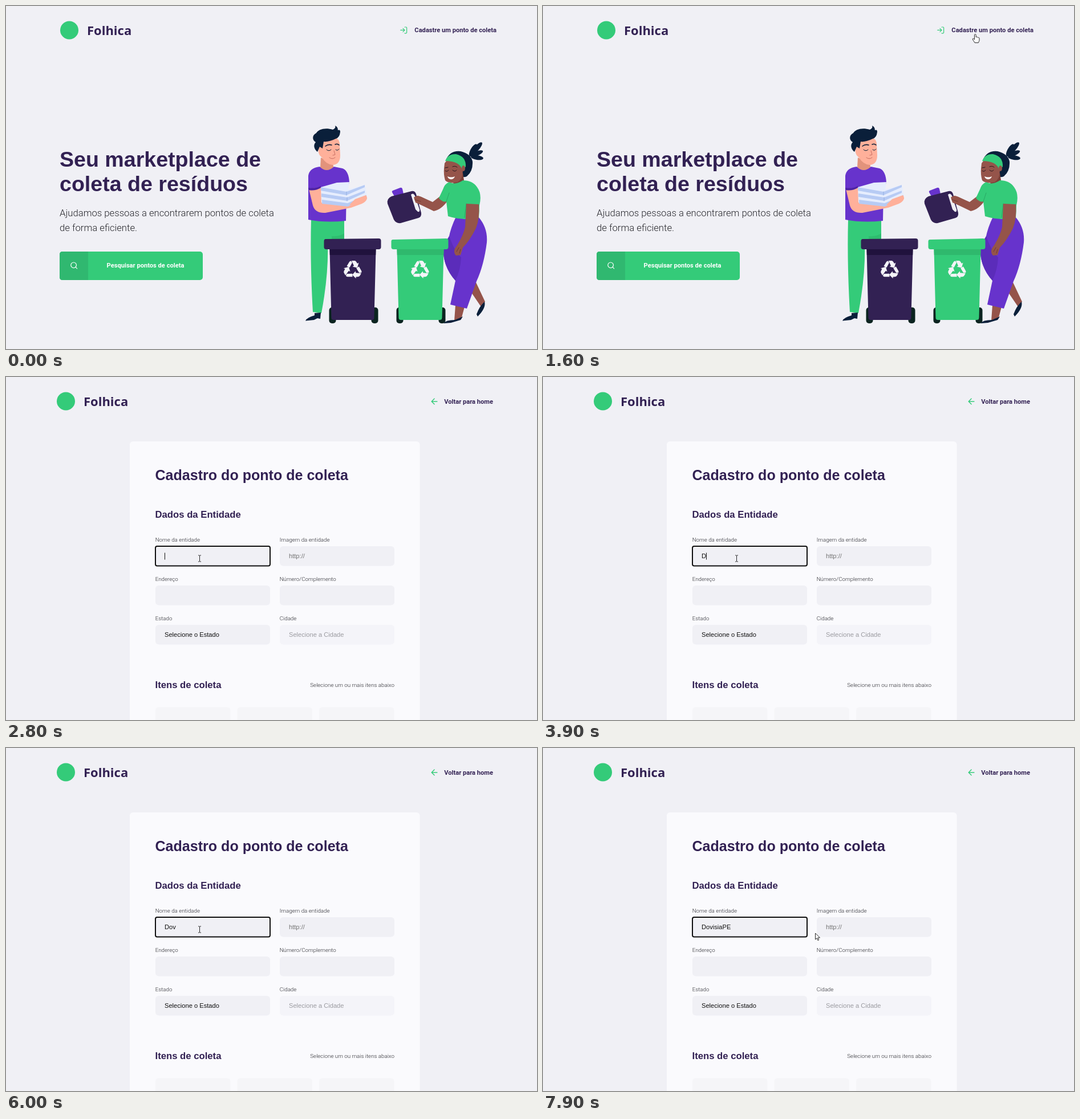
Write an HTML page that moves like this. It is 931 px wide and 602 px high and loops after 8 s.

```html
<!DOCTYPE html>
<html lang="pt-BR">
<head>
<meta charset="utf-8">
<title>Pontos de coleta</title>
<style>
html, body { margin: 0; width: 100%; height: 100%; overflow: hidden; background: #f0f0f5; }
svg { display: block; width: 100vw; height: 100vh; }
.brand { font: 700 22px "Noto Sans", sans-serif; fill: #322153; }
.head { font-family: "Liberation Sans", Arial, sans-serif; font-weight: 700; fill: #322153; }
.link { font: 700 11.14px Roboto, sans-serif; fill: #322153; }
.lead { font: 300 16.7px Roboto, sans-serif; fill: #26262c; }
.label { font: 300 9.75px Roboto, sans-serif; fill: #26262c; }
.input { font: 11.14px "Liberation Sans", Arial, sans-serif; fill: #111; }
.icon { fill: none; stroke: #34cb79; stroke-width: 2; stroke-linecap: round; stroke-linejoin: round; }
.line { fill: none; stroke-width: 1; stroke-linecap: round; }
</style>
</head>
<body>
<svg viewBox="0 0 931 602" preserveAspectRatio="none">
  <defs>
    <path id="arrow" d="M-10.500-6.500L-6-14Q-4.800-16-2.800-15.500L-1-12.500L-5.500-4ZM-2-16H3Q5-16 6.200-14L8-11L10.500-12.500L8-3.500L-.5-5.500L2-7Z"/>
    <g id="recycle" fill="#f4f4f8">
      <use href="#arrow"/>
      <use href="#arrow" transform="rotate(120)"/>
      <use href="#arrow" transform="rotate(240)"/>
    </g>
    <g id="wheels" fill="#0b2420">
      <rect x="9" y="120" width="12" height="28" rx="5"/>
      <rect x="83" y="120" width="12" height="28" rx="5"/>
    </g>
  </defs>
  <rect width="931" height="602" fill="#f0f0f5"/>

  <g id="header">
    <circle cx="111" cy="42.500" r="16" fill="#34cb79"/>
    <text class="brand" x="142" y="51">Folhica</text>
  </g>

  <g id="home">
    <g class="icon" transform="translate(690 35.2) scale(.6)">
      <path d="M15 3h4a2 2 0 0 1 2 2v14a2 2 0 0 1-2 2h-4M10 17l5-5-5-5M15 12H3"/>
    </g>
    <text class="link" x="860" y="46" text-anchor="end">Cadastre um ponto de coleta</text>
    <g class="head" font-size="37.6">
      <text x="94" y="282">Seu marketplace de</text>
      <text x="94" y="325">coleta de resíduos</text>
    </g>
    <text class="lead" x="94" y="369">Ajudamos pessoas a encontrarem pontos de coleta</text>
    <text class="lead" x="94" y="395">de forma eficiente.</text>
    <rect x="94" y="431" width="251" height="50" rx="5" fill="#34cb79"/>
    <path d="M144 431H99Q94 431 94 436V476Q94 481 99 481H144Z" fill="#30b870"/>
    <g class="icon" style="stroke:#fff" transform="translate(112 448.2) scale(.6)">
      <circle cx="11" cy="11" r="8"/><path d="M21 21l-4.350-4.350"/>
    </g>
    <text class="link" style="fill:#fff" x="244.500" y="459.300" text-anchor="middle">Pesquisar pontos de coleta</text>

    <g id="man">
      <path fill="#34cb79" d="M535 375L593 376V412L564 414Q566 470 553 539L538 537Q533 450 535 375Z"/>
      <path fill="#2fbd6f" d="M571 404Q585 405 593 399V411H571Z"/>
      <path fill="#0a1f3a" d="M541 539L552 538L551 549L546 548L540 551L525 552.500Q527 547 541 543Z"/>
      <path fill="#e2937c" d="M552 266L573 276L575 287Q563 295 551 284Z"/>
      <path fill="#6733cc" d="M550 282Q532 284 530 298V375Q560 381 596 377L597 322L602 310Q601 289 590 285L575 282Q562 294 550 282Z"/>
      <path fill="#ffb09a" d="M555 238Q567 236 578 232Q584 233 585 241L586 262Q586 278 573 279Q561 278 554 266Q546 260 548 250Q550 243 555 249Z"/>
      <path fill="#0a1f3a" d="M546 256C539 250 539 243 543 239C536 235 537 226 544 223C548 216 560 213 573 217Q579 214 577 210Q582 212 582 218Q586 216 586 221Q585 231 578 233Q566 239 557 238L555 250L550 247Z"/>
      <g class="line" stroke="#0a1f3a">
        <path d="M562 252Q566 256 570 252M578 252Q581 255 584 251"/>
        <path stroke-width="1.600" d="M560 246Q565 242 571 244M577 243Q581 241 584 244"/>
        <path stroke="#c86e62" d="M567 266Q572 270 577 266M575 254L577 261L573 262"/>
      </g>
      <path fill="#ffb09a" d="M531 321L552 318L556 344L602 345Q611 337 620 336Q633 331 633 338Q631 344 624 347L605 354L560 363Q542 364 538 350Z"/>
      <path fill="#4d22a5" d="M530 319Q542 321 552 316V319Q542 325 531 323Z"/>
      <path fill="#e6edfd" d="M552 318L580 310L602 309L600 322L629 314L633 335L600 349L553 345Z"/>
      <path fill="#b7cbf4" d="M552 318L597 326L629 314V318L597 332L552 324ZM553 329L598 336L629 324V328L598 342L553 335ZM554 340L599 346L632 332V337L599 352L554 347Z"/>
      <path class="line" stroke="#93aee2" d="M597 326V332M598 336V342"/>
      <path fill="#ffb09a" d="M602 349L612 339L631 332Q635 336 630 342L614 350Z"/>
    </g>

    <g id="woman" fill="#95544a">
      <path d="M823 483L840 519L833 528L814 500ZM788 525L804 528L798 550L786 552Z"/>
      <path fill="#0a1f3a" d="M839 519Q842 530 827 545L825 541Q830 527 839 519ZM801 545L797 551L780 556L767 557Q771 551 787 551Z"/>
      <path fill="#6733cc" d="M789 370Q805 377 829 371Q845 390 843 415Q838 455 825 483L808 531L779 524L788 482Q764 455 767 420L776 408Q780 388 789 370Z"/>
      <path fill="#5b2cba" d="M777 404Q786 430 798 441Q797 463 788 482Q764 455 767 420Z"/>
      <path fill="#0a1f3a" d="M771 271Q778 253 797 255Q815 259 818 273Q819 290 808 299Q800 303 797 295Z"/>
      <g fill="#0a1f3a">
        <ellipse cx="819" cy="253" rx="12" ry="4.500" transform="rotate(-60 819 253)"/>
        <ellipse cx="825" cy="250" rx="14" ry="4.500" transform="rotate(-48 825 250)"/>
        <ellipse cx="825" cy="259" rx="12" ry="4" transform="rotate(-22 825 259)"/>
        <ellipse cx="826" cy="266" rx="11" ry="4" transform="rotate(8 826 266)"/>
      </g>
      <path fill="#7c4138" d="M785 300L801 293L804 313L784 314Z"/>
      <path d="M769 276Q776 265 786 268Q799 272 801 289Q801 303 792 309Q777 313 770 306Q767 296 768 285Z"/>
      <path fill="#34cb79" d="M770 272Q775 259 789 260Q807 264 806 282L800 288Q796 272 770 272Z"/>
      <path fill="#fff" d="M774 299Q781 302 787 299Q785 305 779 304Q775 303 774 299Z"/>
      <g class="line" stroke="#24171e">
        <path d="M770 289Q773 292 776 288M783 288Q787 292 790 288M770 284L775 283M783 282Q788 280 791 283"/>
      </g>
      <ellipse cx="802" cy="285" rx="3" ry="5"/>
      <path d="M761 334L748 344L728 335Q719 331 717 336Q713 342 721 346L750 360Q764 357 774 342Z"/>
      <path fill="#34cb79" d="M777 309Q769 312 766 322L759 337Q765 345 772 343L775 369Q800 377 829 372L830 350Q835 330 826 318Q818 306 801 306Q788 315 777 309Z"/>
      <path class="line" stroke="#29a864" d="M772 343L777 328M807 347L804 371"/>
      <path d="M807 347L829 348Q831 372 824 390Q813 412 801 424L797 437L789 438Q782 430 791 420Q802 402 805 388Z"/>
      <path class="line" stroke="#6f3931" d="M790 431L794 424M795 434L797 427"/>
    </g>

    <g id="jug">
      <path fill="#6733cc" d="M678 324L691 319Q694 318 695 321L697 330L681 334L677 327Q676 325 678 324Z"/>
      <path fill="#322153" d="M676 334L711 325Q717 324 719 330L728 363Q729 370 723 372L692 381Q684 382 680 375L669 347Q667 338 676 334Z"/>
      <path fill="#f0f0f5" d="M710 331Q714 327 717 333L725 357Q726 362 722 361L718 357Z"/>
      <path fill="#95544a" d="M715 336Q720 331 728 335L738 340L733 351L718 345Z"/>
      <path class="line" stroke="#6f3931" d="M717 340L727 343"/>
    </g>

    <g transform="translate(557.5 409)">
      <use href="#wheels"/>
      <path fill="#322153" d="M10 18H91L88 138Q88 142 84 142H17Q13 142 13 138Z"/>
      <path fill="#20123d" d="M10 18H91L90.700 28H10.300Z"/>
      <path fill="#322153" d="M3 0L96-1Q100-1 100 3V14Q100 18 96 18H4Q0 18 0 14V4Q0 0 3 0Z"/>
      <use href="#recycle" x="50.500" y="54"/>
    </g>
    <g transform="translate(675.5 409)">
      <use href="#wheels"/>
      <path fill="#34cb79" d="M10 18H92L89 138Q89 142 85 142H17Q13 142 13 138Z"/>
      <path fill="#2fb96d" d="M10 18H92L91.700 28H10.300Z"/>
      <path fill="#34cb79" d="M3 1L96-1Q100-1 100 3V14Q100 18 96 18H4Q0 18 0 14V4Q0 1 3 1Z"/>
      <use href="#recycle" x="50.500" y="54"/>
    </g>
  </g>

  <g id="form">
    <g id="back" class="icon"><path d="M19 12H5M12 19l-7-7 7-7"/></g>
    <text id="backText" class="link" x="854" text-anchor="end">Voltar para home</text>
    <rect x="217" y="113" width="508.500" height="500" rx="5.600" fill="#fafafd"/>
    <text class="head" font-size="25.07" x="261.500" y="181">Cadastro do ponto de coleta</text>
    <text class="head" font-size="16.7" x="261.500" y="247">Dados da Entidade</text>
    <g id="fields"></g>
    <text class="head" font-size="16.7" x="261.500" y="546">Itens de coleta</text>
    <text class="label" x="681" y="544" text-anchor="end">Selecione um ou mais itens abaixo</text>
    <g fill="#f5f5f8">
      <rect x="262" y="579.500" width="131.500" height="40" rx="5.600"/>
      <rect x="405.500" y="579.500" width="131.500" height="40" rx="5.600"/>
      <rect x="549" y="579.500" width="131.500" height="40" rx="5.600"/>
    </g>
    <rect id="focus" x="262" y="297" width="201" height="34.500" rx="3" fill="none" stroke="#101010" stroke-width="2"/>
    <text id="typed" class="input" x="278" y="318"></text>
    <rect id="caret" y="308.500" width="1" height="12" fill="#111"/>
    <g id="tip">
      <rect x="345.500" y="328.500" width="91" height="17" fill="#fff" stroke="#767676"/>
      <text x="391" y="340" text-anchor="middle" font-family="Open Sans, sans-serif" font-size="8.300" fill="#575757">Preencha este campo.</text>
    </g>
  </g>

  <g id="cursors" stroke="#111" stroke-width=".9" stroke-linejoin="round" fill="#fff">
    <path id="pointer" d="M0 0V11L2.600 8.700L4.400 12.700L6.200 11.900L4.400 8H8Z"/>
    <path id="hand" d="M-1.300 8V.8Q0-1 1.300.8V5Q2.700 4 3.500 5.500Q5 4.600 5.600 6.100Q7 5.600 7.200 7V11Q6.500 13 5.500 15H-.8Q-2.500 12-4.400 9.500Q-5 7.600-3.300 7.500Q-2.300 7.700-1.300 9.500Z"/>
    <path id="beam" fill="none" d="M-2.500-5.500H-.7L0-5L.7-5.500H2.500M0-5V5M-2.500 5.500H-.7L0 5L.7 5.500H2.500"/>
  </g>
</svg>
<script>
const LOOP = 8000;
const NAME = "DovisiaPE";
const $ = id => document.getElementById(id);
const show = (id, on) => $(id).setAttribute("display", on ? "inline" : "none");
const place = (id, x, y) => $(id).setAttribute("transform", `translate(${x} ${y})`);

// column, row, label, inner text, inner text colour, box colour
const FIELDS = [
  [0, 0, "Nome da entidade", "", "", "#f0f0f5"],
  [1, 0, "Imagem da entidade", "http://", "#757575", "#f0f0f5"],
  [0, 1, "Endereço", "", "", "#f0f0f5"],
  [1, 1, "Número/Complemento", "", "", "#f0f0f5"],
  [0, 2, "Estado", "Selecione o Estado", "#111", "#f0f0f5"],
  [1, 2, "Cidade", "Selecione a Cidade", "#9b9ba0", "#f4f4f9"]
];
$("fields").innerHTML = FIELDS.map(([col, row, label, text, ink, box]) => {
  const x = 262 + col * 218, y = 297 + row * 69;
  return `<text class="label" x="${x - .3}" y="${y - 8.5}">${label}</text>
    <rect x="${x}" y="${y}" width="201" height="34.5" rx="5.6" fill="${box}"/>
    <text class="input" x="${x + 16}" y="${y + 21}" style="fill:${ink}">${text}</text>`;
}).join("");

// time, text, caret visible
const TYPING = [
  [0, "", false], [2800, "", true], [3200, "", false], [3700, "", true],
  [3900, NAME.slice(0, 1), true], [4000, NAME.slice(0, 2), true],
  [4200, NAME.slice(0, 3), true], [4300, "Dovv", true], [4600, "Dovva", true],
  [4900, "Dovva", false], [5400, "Dovv", false], [5700, "Dovv", true],
  [5800, NAME.slice(0, 3), true], [6000, NAME.slice(0, 3), false],
  [6400, NAME.slice(0, 4), true], [6600, NAME.slice(0, 5), true],
  [6800, NAME.slice(0, 6), true], [7000, NAME.slice(0, 7), true],
  [7100, NAME.slice(0, 8), true], [7400, NAME, true], [7500, NAME, false]
];

// time, x, y, shape, glides on to the next point
const MOUSE = [
  [0, 0, 0, "", false], [100, 326, 205, "pointer", true],
  [900, 904, 65, "pointer", true], [1500, 757.8, 49.5, "hand", false],
  [2200, 667, 161, "pointer", false], [2300, 667, 161, "pointer", true],
  [2700, 339.5, 318.5, "beam", false], [7500, 398, 318.5, "beam", false],
  [7900, 477.5, 325, "pointer", false]
];

const ease = p => p * p * (3 - 2 * p);
const indexAt = (list, t) => list.findLastIndex(k => k[0] <= t);

function drawMouse(t) {
  const i = indexAt(MOUSE, t);
  let [start, x, y, shape, glide] = MOUSE[i];
  if (glide) {
    const [end, nx, ny] = MOUSE[i + 1];
    const p = ease((t - start) / (end - start));
    x += (nx - x) * p;
    y += (ny - y) * p;
  }
  for (const id of ["pointer", "hand", "beam"]) show(id, id === shape);
  if (shape) place(shape, x, y);
}

function drawForm(t) {
  const loaded = t >= 2200;
  $("back").setAttribute("transform", `translate(${loaded ? 742.7 : 738.4} 34.6) scale(.6965)`);
  $("backText").style.fontFamily = loaded ? "Roboto, sans-serif" : '"Liberation Sans", Arial, sans-serif';
  $("backText").setAttribute("y", loaded ? 46.7 : 46);
  show("focus", t >= 2800);
  show("tip", t >= 2900 && t < 3400);
  const [, text, caret] = TYPING[indexAt(TYPING, t)];
  $("typed").textContent = text;
  show("caret", caret);
  if (caret) {
    const width = text ? $("typed").getComputedTextLength() : 0;
    $("caret").setAttribute("x", Math.round(278.4 + width));
  }
}

function render(time) {
  const t = Math.floor(time % LOOP / 100) * 100;
  const inForm = t >= 1700;
  show("home", !inForm);
  show("form", inForm);
  place("header", inForm ? -6 : 0, 0);
  if (inForm) drawForm(t);
  drawMouse(t);
}

const begin = performance.now();
function tick() {
  render(performance.now() - begin);
  requestAnimationFrame(tick);
}
tick();
</script>
</body>
</html>
```
